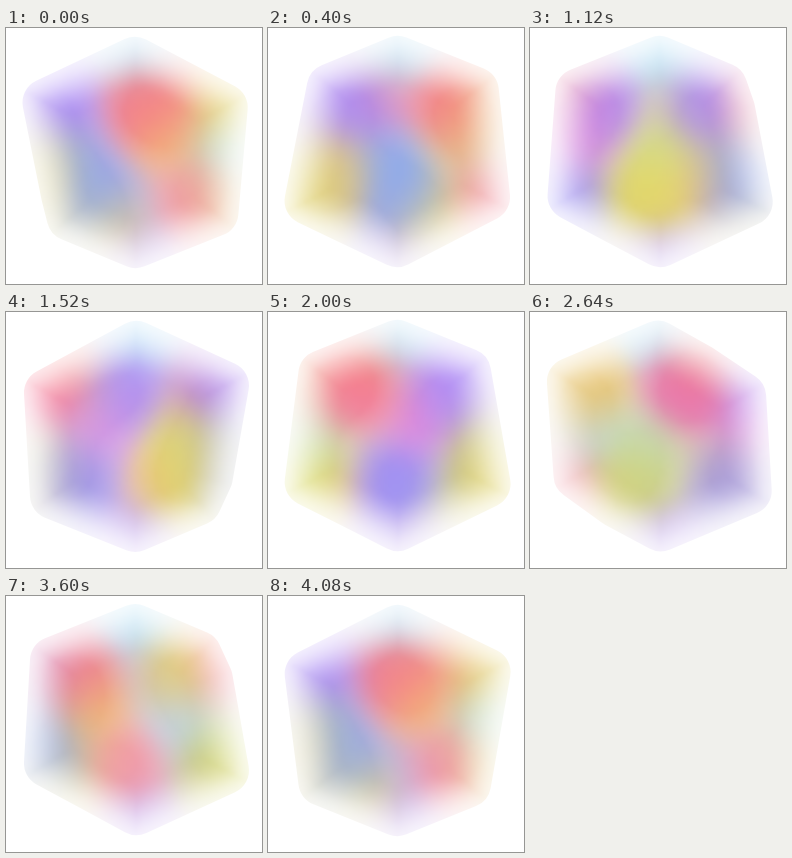
An HTML page with a canvas for the animation above (4.16 s loop, 256 by 256 pixels).

```html
<!DOCTYPE html>
<html lang="en">
<head>
<meta charset="utf-8">
<title>Turning icosahedron</title>
<style>
  html, body { margin: 0; width: 100%; height: 100%; overflow: hidden; background: #fff; }
  canvas { display: block; width: 100vw; height: 100vh; }
</style>
</head>
<body>
<canvas id="stage" width="256" height="256"></canvas>
<script>
const SIZE = 256, CELL = 4, GRID = SIZE / CELL;
const STEP = 80, STEPS = 52;
const CX = 129.5, CY = 124, R = 118, CAMERA = 250;
const RING_R = R * 0.894, RING_Y = R * 0.447;
const START = 5, SPREAD = 25, ROUND = 24;

const UPPER = ["#f03c50", "#8455f2", "#8a58f4", "#f02080", "#dcc428"];
const LOWER = ["#4c74f4", "#d8c41c", "#6a5cf4", "#cccc1c", "#ee6880"];
// angle, height, colour of the tints between the corners
const TINTS = [
  [14, -18, "#f09a28"], [-165, -10, "#d850d8"], [-102, 2, "#c8d030"],
  [-285, -5, "#90d4f4"], [-75, 28, "#e8b030"], [-48, 8, "#4c84f4"],
  [-208, -78, "#f46028"], [-22, 82, "#e4d040"], [-240, 5, "#b8d880"]
];

const rgb = hex => [1, 3, 5].map(i => parseInt(hex.slice(i, i + 2), 16));
const spot = (angle, y, radius, hex, power) => ({ angle, y, radius, color: rgb(hex), power });

const corners = [
  spot(0, -R, 0, "#80ccf0", 0.6),
  spot(0, R, 0, "#9c74e8", 0.6),
  ...UPPER.map((c, i) => spot(-72 * i, -RING_Y, RING_R, c, 1)),
  ...LOWER.map((c, i) => spot(-36 - 72 * i, RING_Y, RING_R, c, 1))
];
const spots = corners.concat(TINTS.map(([a, y, c]) => spot(a, y, RING_R, c, 0.6)));

const ctx = document.getElementById("stage").getContext("2d");
const small = document.createElement("canvas");
small.width = small.height = GRID;
const smallCtx = small.getContext("2d");
const image = smallCtx.createImageData(GRID, GRID);

const smooth = v => {
  const t = Math.min(1, Math.max(0, v));
  return t * t * (3 - 2 * t);
};

function turn(s, degrees) {
  const a = (s.angle + START + degrees) * Math.PI / 180;
  return { x: s.radius * Math.sin(a), y: s.y, z: s.radius * Math.cos(a) };
}

function project(p) {
  const k = CAMERA / (CAMERA - p.z);
  return [CX + p.x * k, CY + p.y * k];
}

function hull(points) {
  const sorted = points.slice().sort((a, b) => a[0] - b[0] || a[1] - b[1]);
  const cross = (o, a, b) => (a[0] - o[0]) * (b[1] - o[1]) - (a[1] - o[1]) * (b[0] - o[0]);
  const half = list => {
    const out = [];
    for (const p of list) {
      while (out.length > 1 && cross(out[out.length - 2], out[out.length - 1], p) <= 0) out.pop();
      out.push(p);
    }
    out.pop();
    return out;
  };
  return half(sorted).concat(half(sorted.reverse()));
}

function outline(poly) {
  const n = poly.length, last = poly[n - 1];
  ctx.beginPath();
  ctx.moveTo((last[0] + poly[0][0]) / 2, (last[1] + poly[0][1]) / 2);
  poly.forEach((p, i) => {
    const q = poly[(i + 1) % n];
    ctx.arcTo(p[0], p[1], q[0], q[1], ROUND);
  });
  ctx.closePath();
}

function shade(poly, degrees) {
  const edges = poly.map((p, i) => {
    const q = poly[(i + 1) % poly.length];
    const dx = q[0] - p[0], dy = q[1] - p[1], len = Math.hypot(dx, dy);
    return { x: p[0], y: p[1], nx: -dy / len, ny: dx / len };
  });
  const lights = spots.map(s => {
    const p = turn(s, degrees);
    return {
      x: CX + p.x * 0.86, y: CY + p.y * 0.83, color: s.color,
      power: s.power * (0.18 + 0.82 * smooth(0.55 + p.z / R * 0.75))
    };
  });
  for (let row = 0, k = 0; row < GRID; row++) {
    for (let col = 0; col < GRID; col++, k += 4) {
      const x = (col + 0.5) * CELL, y = (row + 0.5) * CELL;
      let depth = Infinity;
      for (const e of edges) depth = Math.min(depth, (x - e.x) * e.nx + (y - e.y) * e.ny);
      let r = 0, g = 0, b = 0, sum = 1e-9;
      for (const l of lights) {
        const d2 = (x - l.x) ** 2 + (y - l.y) ** 2;
        const w = l.power * Math.exp(-d2 / (2 * SPREAD * SPREAD));
        r += w * l.color[0];
        g += w * l.color[1];
        b += w * l.color[2];
        sum += w;
      }
      const cover = 0.16 + 0.84 * smooth((depth + 6) / 56);
      image.data[k] = r / sum;
      image.data[k + 1] = g / sum;
      image.data[k + 2] = b / sum;
      image.data[k + 3] = 255 * cover * (0.46 + 0.22 * Math.min(1, sum));
    }
  }
  smallCtx.putImageData(image, 0, 0);
}

function draw(step) {
  const degrees = step * 360 / STEPS;
  const poly = hull(corners.map(s => project(turn(s, degrees))));
  shade(poly, degrees);
  ctx.fillStyle = "#fff";
  ctx.fillRect(0, 0, SIZE, SIZE);
  ctx.save();
  outline(poly);
  ctx.clip();
  ctx.imageSmoothingQuality = "high";
  ctx.drawImage(small, 0, 0, SIZE, SIZE);
  ctx.restore();
}

const begin = performance.now();
let shown = -1;
function tick() {
  const step = Math.floor((performance.now() - begin) / STEP) % STEPS;
  if (step !== shown) draw(shown = step);
  requestAnimationFrame(tick);
}
tick();
</script>
</body>
</html>
```
